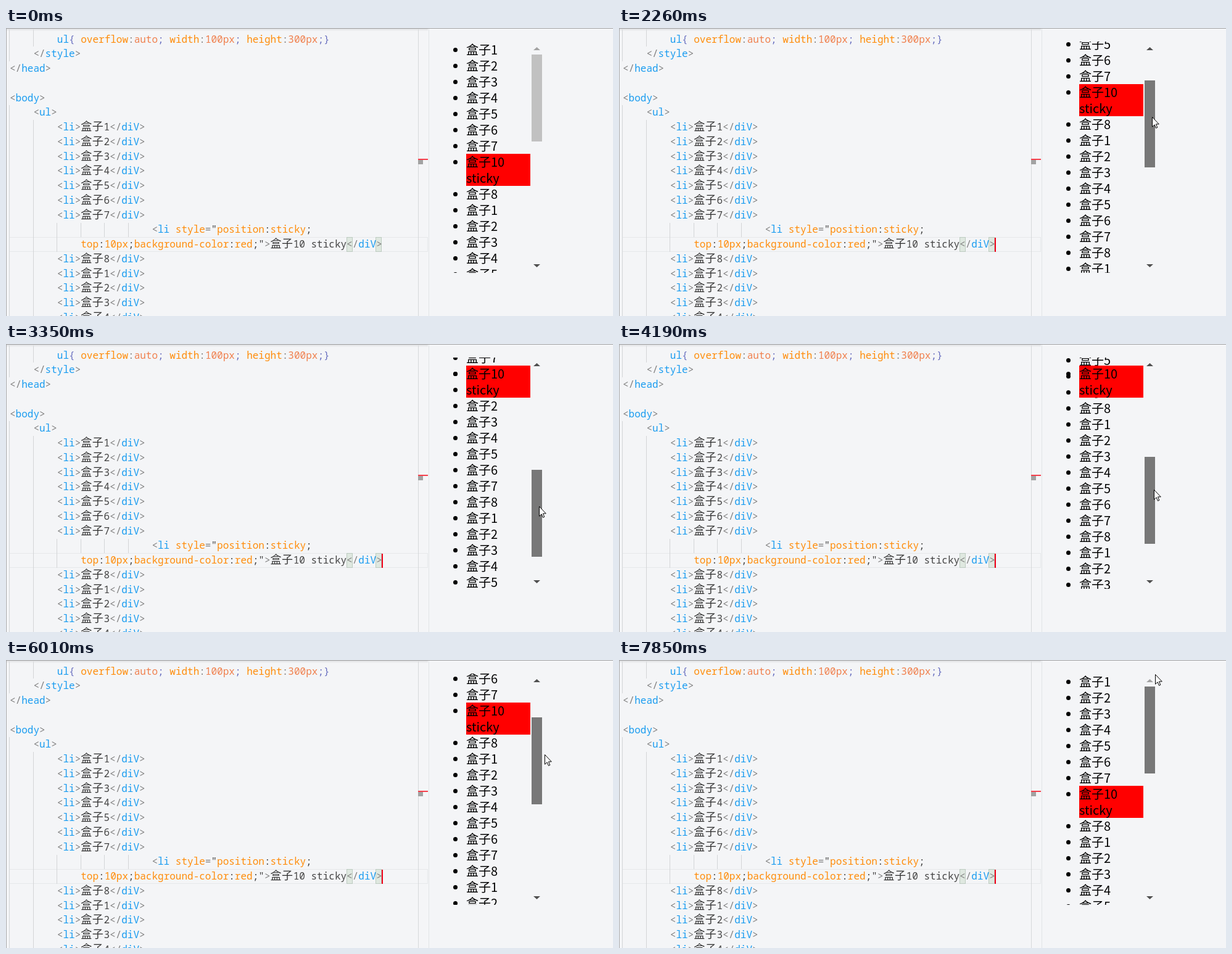
Animation, 984 px wide and 467 px high, one loop 8 s. Source, as an HTML page:

```html
<!DOCTYPE html>
<html lang="zh">
<head>
<meta charset="utf-8">
<title>Sticky list</title>
<style>
html, body { margin: 0; width: 100%; height: 100%; overflow: hidden; background: #f4f5f7; }
#stage { position: relative; width: 984px; height: 467px; overflow: hidden; background: #f4f5f7; }
#stage div, #stage svg { position: absolute; }
.line {
  left: 6px; height: 23.75px; white-space: pre; color: #444;
  font: 16px/23.75px "Noto Sans Mono", "DejaVu Sans Mono", monospace;
  font-variant-ligatures: none;
}
.line i { font-style: normal; }
.p { color: #808080; }
.n { color: #1a9cf0; }
.a { color: #ff8c0a; }
.v { color: #f0804e; }
.b { color: #6a70c0; }
.d { color: #444; }
.line .c {
  font: 18px/0 "Noto Sans CJK SC", "Noto Sans CJK", sans-serif;
  letter-spacing: .6px; color: #333;
}
.guide { width: 1px; background: #d3d5d7; }
.match { top: 339px; width: 8px; height: 22px; background: #dfe8e0; border: 1px solid #bccbc0; }
#view { left: 710px; top: 22px; width: 140px; height: 375px; overflow: hidden; }
.item {
  left: 36px; width: 104px; line-height: 26px; font-size: 20px; color: #000;
  font-family: "Noto Sans CJK SC", "Noto Sans CJK", sans-serif;
}
.item::before {
  content: ""; position: absolute; left: -21px; top: 10px;
  width: 7px; height: 7px; border-radius: 50%; background: #000;
}
#sticky { background: red; height: 52px; }
#list { left: 0; top: 0; width: 140px; }
#thumb { left: 852px; width: 17px; height: 141px; }
.arrow { left: 855px; width: 11px; height: 5px; }
#caret { left: 609px; top: 340px; width: 2px; height: 23px; background: #f00018; }
</style>
</head>
<body>
<div id="stage"></div>
<script>
const stage = document.getElementById('stage');

function add(parent, css, html = '', cls = '', id = '') {
  const el = document.createElement('div');
  el.style.cssText = css;
  el.innerHTML = html;
  el.className = cls;
  if (id) el.id = id;
  return parent.appendChild(el);
}
const box = (x, y, w, h, color) =>
  add(stage, `left:${x}px;top:${y}px;width:${w}px;height:${h}px;background:${color}`);
const guide = (x, y, end) => add(stage, `left:${x}px;top:${y}px;height:${end - y}px`, '', 'guide');

// Editor
const tok = (cls, text) => `<i class="${cls}">${text.replace(/</g, '&lt;')}</i>`;
const open = name => tok('p', '<') + tok('n', name) + tok('p', '>');
const close = name => tok('p', '</') + tok('n', name) + tok('p', '>');
const rule = (prop, value) => tok('a', prop) + tok('p', ':') + tok('v', value) + tok('b', ';');
const inline = css => css.split(/([:;])/).map(s => tok(/[:;]/.test(s) ? 'd' : 'a', s)).join('');
const label = tok('c', '盒子');
const row = n => [8, open('li') + label + n + close('diV')];

const lines = [
  [8, tok('n', 'ul') + tok('b', '{') + ' ' + rule('overflow', 'auto') + ' ' +
      rule('width', '100px') + ' ' + rule('height', '300px') + tok('b', '}')],
  [4, close('style')],
  [0, close('head')],
  [0, ''],
  [0, open('body')],
  [4, open('ul')],
  ...[1, 2, 3, 4, 5, 6, 7].map(row),
  [24, tok('p', '<') + tok('n', 'li') + ' ' + tok('a', 'style') + tok('p', '=') + tok('d', '"') + inline('position:sticky;')],
  [12, inline('top:10px;background-color:red;') + tok('d', '"') + tok('p', '>') + label + '10 sticky' + close('diV')],
  ...[8, 1, 2, 3, 4].map(row)
];

add(stage, 'left:5px;top:339px;width:677px;height:22px;border:1px solid #e6e8ea');
guide(5, 0, 54);
guide(5, 125, 467);
guide(44, 0, 30);
guide(44, 149, 467);
guide(82, 316, 363);
[121, 159, 198].forEach(x => guide(x, 316, 339));
[552, 599].forEach(x => add(stage, `left:${x}px`, '', 'match'));
lines.forEach(([col, html], i) =>
  add(stage, `top:${6.5 + i * 23.75}px`, ' '.repeat(col) + html, 'line'));

box(668, 0, 1, 467, '#d6d8da');
box(685, 0, 1, 467, '#e2e4e6');
box(668, 213, 8, 8, '#a2a2a2');
box(668, 212, 16, 2, '#f5404c');
box(0, 1, 684, 4, 'linear-gradient(#dcdddf,#f4f5f700)');
box(0, 0, 984, 1, '#a0a1a3');
box(0, 0, 1, 467, '#a8a9ab');
const caret = add(stage, '', '', '', 'caret');

// Scrolling list
const view = add(stage, '', '', '', 'view');
const list = add(view, '', '', '', 'list');
for (let i = 0; i < 32; i++) {
  const top = 26 * (i < 7 ? i : i + 2);
  add(list, `top:${top}px`, '盒子' + (i % 8 + 1), 'item');
}
const sticky = add(view, '', '盒子10<br>sticky', 'item', 'sticky');

const thumb = add(stage, '', '', '', 'thumb');
const up = add(stage, 'top:31px;clip-path:polygon(50% 0,100% 100%,0 100%)', '', 'arrow');
add(stage, 'top:383px;background:#505050;clip-path:polygon(0 0,100% 0,50% 100%)', '', 'arrow');

const pointer = add(stage, 'left:0;top:0;width:14px;height:20px',
  '<svg width="14" height="20"><path d="M.5 .5V16.2L4.1 12.8L6.5 18.4L8.8 17.4L6.5 11.9H11.3Z" fill="#fff" stroke="#000"/></svg>');

const LOOP = 8000, ENTER = 500;
const FIRST = 430, STEP = 139;            // screen refresh, ms
const PRESS = 9;                          // step at which the thumb is grabbed
const GRAB = 99.5, LAG = .13;             // pointer y at scroll 0; scroll delay in steps
const MAX_SCROLL = 509, TRAVEL = 192;     // list and thumb range
const BLINK_START = 1900, BLINK = 490;

// Turning points of the pointer: step, x, y
const turns = [
  [0, 943, 435], [5, 842, 150], [PRESS, 864, 99.3], [10, 864, 99.3], [23, 864, 293.1],
  [25, 864, 296], [31, 873, 116.4], [34, 877, 64], [35, 877, 64], [36, 873, 69.9],
  [46, 873, 277.7], [53, 869, 23]
];

function pointerAt(step) {
  const i = turns.findIndex(p => p[0] >= step);
  if (i < 1) return turns[i ? turns.length - 1 : 0].slice(1);
  const a = turns[i - 1], b = turns[i];
  const u = (step - a[0]) / (b[0] - a[0]);
  return [1, 2].map(k => a[k] + (b[k] - a[k]) * u);
}

function scrollAt(step) {
  if (step <= PRESS) return 0;
  const drag = pointerAt(step - LAG)[1] - GRAB;
  return Math.round(Math.min(Math.max(drag, 0), TRAVEL) * MAX_SCROLL / TRAVEL);
}

function draw(t) {
  const moving = t >= ENTER;
  const step = moving ? Math.floor((t - FIRST) / STEP) : 0;
  const time = FIRST + step * STEP;
  const [x, y] = pointerAt(step).map(Math.round);
  const scroll = scrollAt(step);

  const hover = moving && x >= 852 && x <= 869 && y < 184;
  thumb.style.background = step >= PRESS ? '#787878' : hover ? '#a8a8a8' : '#c1c1c1';
  thumb.style.top = 43 + Math.floor(scroll * TRAVEL / MAX_SCROLL) + 'px';
  up.style.background = scroll ? '#505050' : '#a3a3a3';
  list.style.top = -scroll + 'px';
  sticky.style.top = Math.max(182 - scroll, 13) + 'px';
  pointer.style.display = moving ? 'block' : 'none';
  pointer.style.left = x + 'px';
  pointer.style.top = y + 'px';
  const lit = time >= BLINK_START && Math.floor((time - BLINK_START) / BLINK) % 2 === 0;
  caret.style.display = lit ? 'block' : 'none';
}

const start = performance.now();
function tick() {
  draw((performance.now() - start) % LOOP);
  requestAnimationFrame(tick);
}
tick();
</script>
</body>
</html>
```
